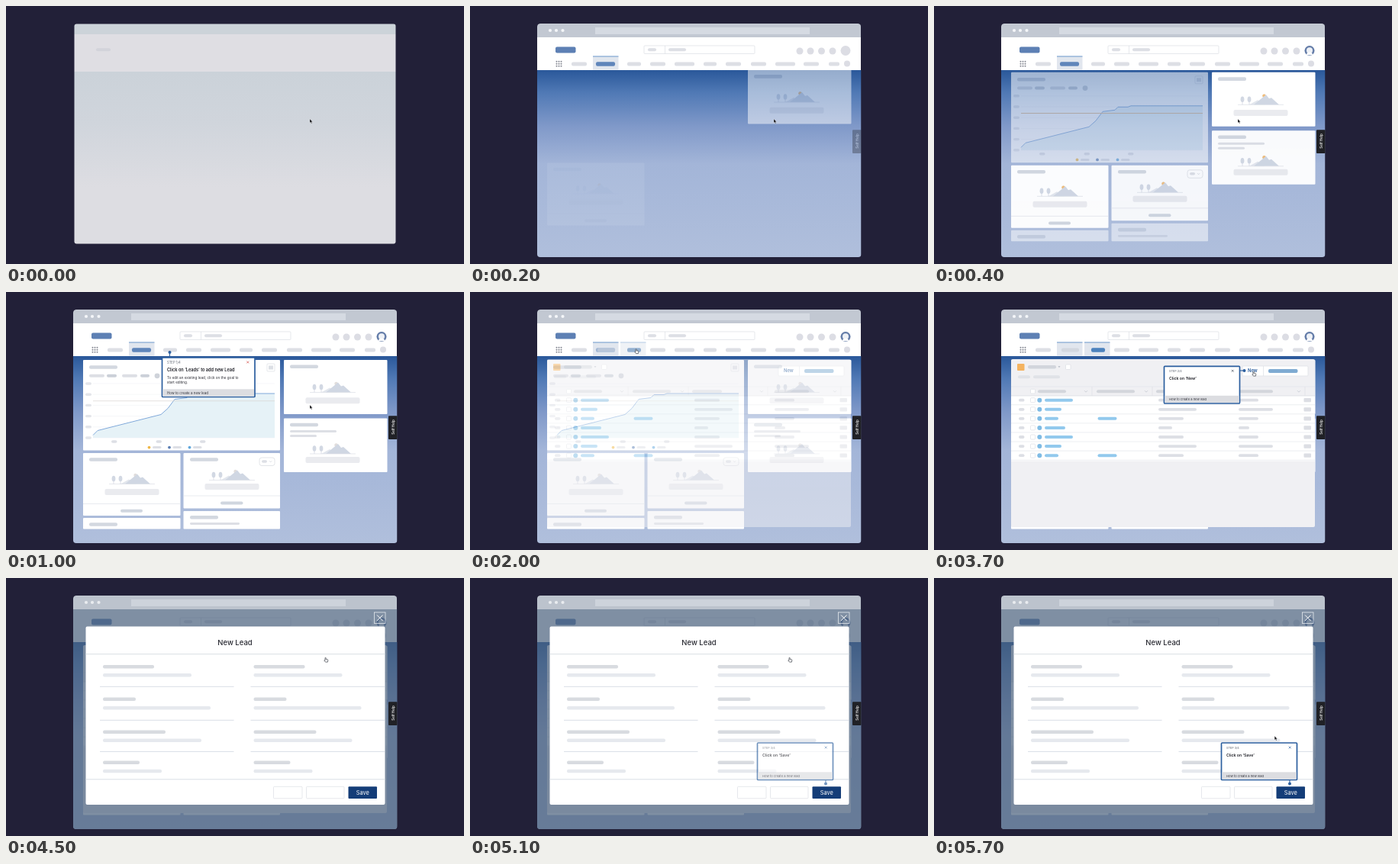
These frames come from a looping animation (600 by 338 pixels, 5.8 s). An HTML page:

```html
<!DOCTYPE html>
<html lang="en">
<head>
<meta charset="utf-8">
<title>Guided lead creation</title>
<style>
  html, body { margin: 0; width: 100%; height: 100%; overflow: hidden; background: #222038; }
  svg { display: block; width: 100vw; height: 100vh; }
  text { font-family: Inter, "Liberation Sans", sans-serif; }
</style>
</head>
<body>
<svg id="stage" viewBox="0 0 600 338"></svg>
<script>
const LOOP = 5800, STEP = 100;

// Shape helpers return SVG markup.
const rect = (x, y, x2, y2, fill, extra = '') =>
  `<rect x="${x}" y="${y}" width="${x2 - x}" height="${y2 - y}" fill="${fill}" ${extra}/>`;
const box = (x, y, x2, y2, stroke = '#dcdee4', fill = '#fff', extra = 'rx="1"') =>
  rect(x, y, x2, y2, fill, `stroke="${stroke}" stroke-width=".7" ${extra}`);
const pill = (x, x2, y, h = 4.6, fill = '#dddfe5') =>
  rect(x, y - h / 2, x2, y + h / 2, fill, `rx="${Math.min(h / 2, 2)}"`);
const circle = (x, y, r, fill, extra = '') =>
  `<circle cx="${x}" cy="${y}" r="${r}" fill="${fill}" ${extra}/>`;
const path = (d, stroke, width = .7, fill = 'none') =>
  `<path d="${d}" stroke="${stroke}" stroke-width="${width}" fill="${fill}"/>`;
const hline = (x, x2, y, stroke = '#dfe2e8', width = .7) => path(`M${x} ${y}H${x2}`, stroke, width);
const text = (x, y, size, str, fill = '#23242b', weight = 400, extra = '') =>
  `<text x="${x}" y="${y}" font-size="${size}" fill="${fill}" font-weight="${weight}" ${extra}>${str}</text>`;
const group = (id, body, extra = '') => `<g id="${id}" ${extra}>${body}</g>`;
const cross = (x, y, r, stroke, width) =>
  path(`M${x - r} ${y - r}l${2 * r} ${2 * r}M${x + r} ${y - r}l${-2 * r} ${2 * r}`, stroke, width);

function browserBar() {
  return path('M88 41V27a4 4 0 0 1 4-4H508a4 4 0 0 1 4 4V41Z', 'none', 0, '#c2c8d2') +
    [105, 113, 121.5].map(x => circle(x, 32, 2.1, '#f4f6f9')).join('') +
    rect(164, 28, 445, 37, '#d5dae2');
}

const tab = (x, x2) => rect(x, 66, x2, 83.5, '#e1e6ee') + hline(x, x2, 66, '#6b97cc', 1.2);

function siteHeader() {
  let s = rect(88, 41, 512, 84, '#fff') + pill(112, 138.5, 57.5, 8, '#5d80b4');
  s += box(228, 52, 373, 62.5) + path('M255.5 52V62.5', '#dcdee4') + pill(233, 244, 57.2, 4) + pill(260, 283, 57.2, 4);
  for (const x of [432, 446, 460.5, 475]) s += circle(x, 59, 4.5, '#dcdde4');
  s += circle(492, 58.5, 6.5, '#dcdde4');
  s += group('avatar', circle(492, 58.5, 6.5, '#647da9') + circle(492, 58.2, 4, '#eef1f6') +
    path('M488 64.3Q488 60.5 492 60.5T496 64.3Z', 'none', 0, '#fff'));
  for (let i = 0; i < 9; i++) s += circle(113.5 + i % 3 * 3, 72.8 + (i / 3 | 0) * 3, 1, '#858892');
  const navPills = [[133, 153], [206, 224], [236, 256], [268, 294], [306, 323], [335, 355], [368, 388], [400, 426], [437, 457], [470, 484]];
  for (const [a, b] of navPills) s += pill(a, b, 76, 5);
  s += circle(494, 75.5, 4, '#dcdde4') + tab(161, 194.5);
  s += group('homeOn', pill(165, 190, 76, 5.4, '#5f85ba')) + group('homeOff', pill(167, 190, 76, 5, '#d2d7df'));
  return s + group('leadsOn', tab(197, 230.5) + pill(206, 224, 76, 5.4, '#4c82bd'));
}

function landscape(cx, base, textY) {
  const p = (x, y) => `${cx + x} ${base + y}`;
  return [-24, -15].map(x => path(`M${p(x, 0)}V${base - 6}`, '#c6ccd8', .6) +
      `<ellipse cx="${cx + x}" cy="${base - 7}" rx="2.4" ry="3.8" fill="#d2d8e3"/>`).join('') +
    circle(cx + 4.5, base - 11.5, 2.2, '#dfe1e7') +
    circle(cx + 4.5, base - 11.5, 2.2, '#f2bd78', 'class="warm"') +
    path(`M${p(-15, 0)}L${p(-4, -6)}L${p(6, 0)}Z`, 'none', 0, '#e2e6ed') +
    path(`M${p(-9, 0)}L${p(7, -13)}L${p(11, -8)}L${p(14, -9)}L${p(24, 0)}Z`, 'none', 0, '#d0d7e3') +
    hline(cx - 30, cx + 30, base, '#dcdfe6') +
    pill(cx - 35.5, cx + 35.5, textY, 8, '#eaebef');
}

const card = (x, y, x2, y2) => rect(x, y, x2, y2, '#fff', 'rx="1"');
const title = (x, y) => pill(x, x + 37, y, 4.6, '#d3d8e0');

function chartCard() {
  let s = card(101, 89, 359, 207.5) + title(109, 98.5);
  s += pill(109, 129, 109.8, 4) + pill(132, 145, 109.8, 4, '#cbd0d8') + pill(152, 172, 109.8, 4) + pill(176, 188, 109.8, 4, '#cbd0d8');
  s += circle(198, 109.8, 3.4, '#cfd3da') + box(342, 94, 352, 104) + rect(344, 96.5, 350, 101.5, '#dcdfe5');
  for (let y = 120; y < 195; y += 14.2) s += pill(104, 112, y, 3.4, '#e3e5ea') + hline(114, 352, y, '#edeff3', .5);
  const line = 'M114 187.5L120 181.5L203 160.5L212 152.5L221 140.5L237 138.5L241 134.5H254L258 133H352';
  s += path(line + 'V191H114Z', 'none', 0, '#e6f2f7') + path(line, '#80a9da', 1);
  s += hline(114, 352, 142.7, '#d8dbe0') + group('', hline(114, 352, 142.7, '#e4b985', .9), 'class="warm"');
  for (const x of [138, 196.5, 254]) s += pill(x, x + 7.5, 196, 3.6);
  ['#efb849', '#5d80b4', '#62a8dc'].forEach((c, i) => {
    const x = 187.5 + 26.5 * i;
    s += circle(x, 203.6, 1.9, c) + pill(x + 4.5, x + 16, 203.6, 3);
  });
  return s;
}

function dashboard() {
  const right1 = card(364, 89, 499.5, 160) + title(372, 97.8) + landscape(428, 131.5, 142.2);
  const right2 = card(364, 165.5, 499.5, 236) + title(372, 174) + pill(372, 433, 182.5, 3) +
    pill(372, 407, 188.5, 3) + landscape(428, 212, 220);
  const low1 = card(101, 211, 228.5, 293) + title(109, 219.5) + landscape(165, 251.5, 262) +
    hline(101, 228.5, 277.5) + pill(150, 179, 286.7, 4, '#d0d6df');
  const low2 = card(232.5, 211, 359, 283.5) + title(241, 219.5) + box(332, 217, 352, 227.5, '#d7dae0', '#fff', 'rx="3"') +
    pill(335, 342, 222, 3.6) + path('M345 221.3l1.6 1.6l1.6-1.6', '#c3c8d1', .6) +
    landscape(296, 246.5, 255) + hline(232.5, 359, 267) + pill(281, 310.5, 276.5, 4, '#d0d6df');
  const bottom = card(101, 296, 228.5, 310.5) + title(109, 304.5) +
    card(232.5, 287, 359, 310.5) + title(241, 295.3) + pill(241, 306, 303.5, 2.8);
  return group('right1', right1) + group('right2', right2) + group('low1', low1) +
    group('low2', low2) + group('bottom', bottom) + group('chart', chartCard());
}

function leadsPage() {
  let s = rect(101, 88, 499, 308, '#f0f0f3', 'rx="2"');
  s += rect(109, 94, 118.5, 103, '#f4b360', 'rx="1"') + pill(123, 160, 98.2, 4.6, '#d2d5dc') +
    path('M162.5 97.3l1.5 1.8l1.5-1.8Z', 'none', 0, '#aeb4be') + box(172.5, 95, 179, 101.5) +
    pill(110, 126, 111.2, 4, '#e0e2e7') + pill(130, 165, 111.2, 4, '#e0e2e7');
  s += box(404, 97, 490, 110) + path('M431.5 97V110', '#dcdee4') +
    text(411, 105.4, 5.9, 'New', '#285b9c', 600) + pill(438, 476.5, 103.5, 4.8, '#7fabd2');
  s += hline(101, 499, 124) + rect(101, 136, 499, 221.5, '#fff') + hline(101, 499, 136, '#d6d9df') + box(126.5, 127.3, 132.5, 133);
  const heads = [[136, 173, 199], [213, 263, 278], [291, 330, 382], [399, 444, 478]];
  for (const [a, b, chev] of heads)
    s += pill(a, b, 130.3, 4, '#d3d6dc') + path(`M${chev - 2} 129.2l2 2l2-2`, '#b4bac4', .6) + path(`M${chev + 8} 124V136`, '#dcdee4', .6);
  const names = [182, 167, 163, 172], sources = [327, 344, 327, 312], owners = [425, 444, 425, 413];
  for (let i = 0; i < 7; i++) {
    const y = 141.7 + i * 12.08;
    s += pill(111, 118.5, y, 3.8) + box(126.5, y - 3, 132.5, y + 3) + circle(138.3, y, 3, '#7fbbe4') +
      pill(145, names[i % 4], y, 4, '#92c9ed') + (i % 4 === 2 ? pill(214.5, 239.5, y, 4, '#92c9ed') : '') +
      pill(294, sources[i % 4], y, 3.8) + pill(399, owners[i % 4], y, 3.8) +
      rect(484.5, y - 2.6, 494, y + 2.6, '#dcdee4', 'rx="1"') + hline(101, 499, y + 6.04, '#e0e2e7', .6);
  }
  return s;
}

function newLeadModal() {
  let s = rect(104.5, 63.5, 496.5, 297, '#fff', 'rx="2"') +
    text(300, 87.6, 9.5, 'New Lead', '#2a2b33', 500, 'text-anchor="middle"') + hline(104.5, 496.5, 99.7, '#d5dce3', .9);
  const fields = [[116.2, 67, 127.2, 116, 142.3], [158.7, 43, 170.2, 141, 186.3], [201.7, 82, 212.7, 129, 227.4], [241.8, 48, 253, 77, 0]];
  for (const x of [127, 324.5]) for (const [ly, lw, vy, vw, end] of fields) {
    s += pill(x, x + lw, ly, 4.6, '#d8dbe0') + pill(x, x + vw, vy, 4.6, '#e6e9ee');
    if (end) s += hline(x - 4, x + 171.5, end, '#d5dbe4', .9);
  }
  s += hline(104.5, 496.5, 263.8, '#d5dce3', .9) + box(350.5, 273.3, 388, 288.8) + box(393.5, 273.3, 443, 288.8);
  return s + rect(448.5, 273.2, 486, 289, '#143d78', 'rx="1"') +
    text(467.2, 283.8, 7.4, 'Save', '#fff', 400, 'text-anchor="middle"');
}

function popup(x, y, w, h, step, heading, size, body, closeColor) {
  const small = size > 5.4 ? 4.5 : 4.1;
  return box(x, y, x + w, y + h, '#2c5f9f', '#fff', 'rx="1" style="stroke-width:1.7"') +
    rect(x + 1, y + h - 10.2, x + w - 1, y + h - 1, '#dcdde1') +
    text(x + 6.5, y + 8, small - .3, `STEP ${step}/4`, '#5d6470') +
    cross(x + w - 9.3, y + 6, 1.4, closeColor, .7) +
    text(x + 6.5, y + 18, size, heading, '#1d1e25', 600) +
    body.map((line, i) => text(x + 6.5, y + 27.8 + i * 5.8, 4.6, line, '#2c2d35')).join('') +
    text(x + 6.5, y + h - 4, small, 'How to create a new lead', '#35363e');
}
const connector = (d, x, y) => path(d, '#2c5f9f', 1.1) + circle(x, y, 2, '#2c5f9f');

const svg = document.getElementById('stage');
svg.innerHTML = `
<defs>
  <linearGradient id="sky" x1="0" y1="0" x2="0" y2="1">
    <stop offset="0" stop-color="#2a589a"/><stop offset=".12" stop-color="#5079b5"/>
    <stop offset=".3" stop-color="#8099c9"/><stop offset=".5" stop-color="#a3b5d8"/><stop offset="1" stop-color="#b0bfdc"/>
  </linearGradient>
  <linearGradient id="mist" x1="0" y1="0" x2="0" y2="1">
    <stop offset="0" stop-color="#cbd2d9"/><stop offset=".3" stop-color="#d0d5dc"/><stop offset=".67" stop-color="#dddde2"/>
  </linearGradient>
  <clipPath id="frame"><rect x="88" y="23" width="424.5" height="306" rx="4"/></clipPath>
  <clipPath id="ghostFrame"><rect x="89.5" y="23.5" width="421" height="288" rx="3"/></clipPath>
</defs>
${rect(0, 0, 600, 338, '#222038')}
${group('ghost', rect(89, 23, 511, 37, '#ccd3d9') + rect(89, 37, 511, 86, '#dfdee3') +
  rect(89, 86, 511, 312, 'url(#mist)') + pill(118, 137, 57.3, 4, '#d2d3da'), 'clip-path="url(#ghostFrame)"')}
${group('window',
  rect(88, 84, 512.5, 329, 'url(#sky)') + group('cards', dashboard()) + group('leads', leadsPage()) +
  siteHeader() + browserBar() +
  group('shade', rect(88, 41, 512.5, 329, 'rgb(73,96,124)', 'opacity=".7"') + rect(88, 23, 512.5, 41, '#8c9099', 'opacity=".1"')),
  'clip-path="url(#frame)"')}
${group('modal', box(482.5, 45, 497, 59.5, '#f3f5f8', 'none', '') + cross(489.8, 52.3, 3.8, '#fff', 1) + newLeadModal())}
${group('help', rect(501, 162.3, 512.5, 193, '#202126', 'rx="1"') +
  text(0, 1.6, 4.5, 'Self Help', '#fff', 500, 'text-anchor="middle" transform="translate(507 177) rotate(-90)"'))}
${group('pop1', connector('M214.5 79V86', 214.5, 79) + popup(204.5, 86, 121.5, 51.5, 1, "Click on ‘Leads’ to add new Lead", 5.6,
  ['To edit an existing lead, click on the goal to', 'start editing.'], '#d2453f'))}
${group('pop2', connector('M401 103H406.5', 406.5, 103) + popup(301.5, 97.3, 99, 48.7, 2, "Click on ‘New’", 5.2, [], '#3d4655'))}
${group('pop3', connector('M466 265V269.5', 466, 269.5) + popup(376.5, 216, 99, 48.5, 3, "Click on ‘Save’", 5.2, [], '#2c5f9f'))}
${group('pointer',
  group('arrow', path('M0 0V5L1.2 4L2 5.9L2.9 5.5L2.1 3.7H3.6Z', '#fff', .3, '#0d0d12')) +
  group('hand', path('M0 0q.7-.8 1.1.2v1.6l2.2.5q.7.2.5 1.1l-.4 2.2H.5l-1.7-2.1q.3-.8 1.2 0Z', '#3c3f48', .7, '#fff')))}
`;

const el = id => document.getElementById(id);
const clamp = v => Math.max(0, Math.min(1, v));
const ramp = (t, from, to) => clamp((t - from) / (to - from));
const smooth = p => p * p * (3 - 2 * p);
const show = (id, alpha) => {
  el(id).setAttribute('opacity', alpha);
  el(id).style.display = alpha > 0 ? '' : 'none';
};
const warm = [...document.querySelectorAll('.warm')];

// Each move runs from the previous resting place: start, end, x, y.
const moves = [[1200, 1800, 217, 75], [2500, 3300, 418, 104.5], [5260, 6060, 467, 283]];

function cursorAt(t) {
  let x = 398, y = 148;
  for (const [from, to, tx, ty] of moves) {
    const p = smooth(ramp(t, from, to));
    x += (tx - x) * p;
    y += (ty - y) * p;
  }
  return [x, y];
}

function draw(t) {
  show('ghost', 1 - ramp(t, 0, 200));
  show('window', ramp(t, 0, 200));
  show('avatar', ramp(t, 200, 400));
  show('help', ramp(t, 100, 400));

  const slide = -10 * Math.pow(1 - ramp(t, 0, 700), 1.8);
  el('cards').setAttribute('transform', `translate(0 ${slide.toFixed(2)})`);
  show('right1', ramp(t, 100, 300));
  show('right2', ramp(t, 200, 410));
  show('low1', ramp(t, 180, 410));
  show('low2', ramp(t, 200, 425));
  show('bottom', ramp(t, 300, 500));
  show('chart', ramp(t, 280, 500));
  for (const node of warm) node.setAttribute('opacity', 1 - .9 * ramp(t, 500, 900));

  const onLeads = ramp(t, 1850, 2150);
  show('leads', onLeads);
  show('leadsOn', onLeads);
  show('homeOn', 1 - onLeads);
  show('homeOff', onLeads);

  const opened = ramp(t, 4250, 4450);
  show('shade', opened);
  show('modal', opened);
  show('pop1', ramp(t, 600, 850) * (1 - ramp(t, 1850, 2000)));
  show('pop2', ramp(t, 2200, 2500) * (1 - ramp(t, 4200, 4350)));
  show('pop3', ramp(t, 4900, 5200));

  const [x, y] = cursorAt(t);
  const overLink = (t >= 1750 && t < 2550) || (t >= 3250 && t < 5300);
  el('pointer').setAttribute('transform', `translate(${x.toFixed(2)} ${y.toFixed(2)})`);
  show('hand', overLink ? 1 : 0);
  show('arrow', overLink ? 0 : 1);
}

const start = performance.now();
function tick() {
  const t = (performance.now() - start) % LOOP;
  draw(Math.floor(t / STEP) * STEP);
  requestAnimationFrame(tick);
}
draw(0);
requestAnimationFrame(tick);
</script>
</body>
</html>
```
